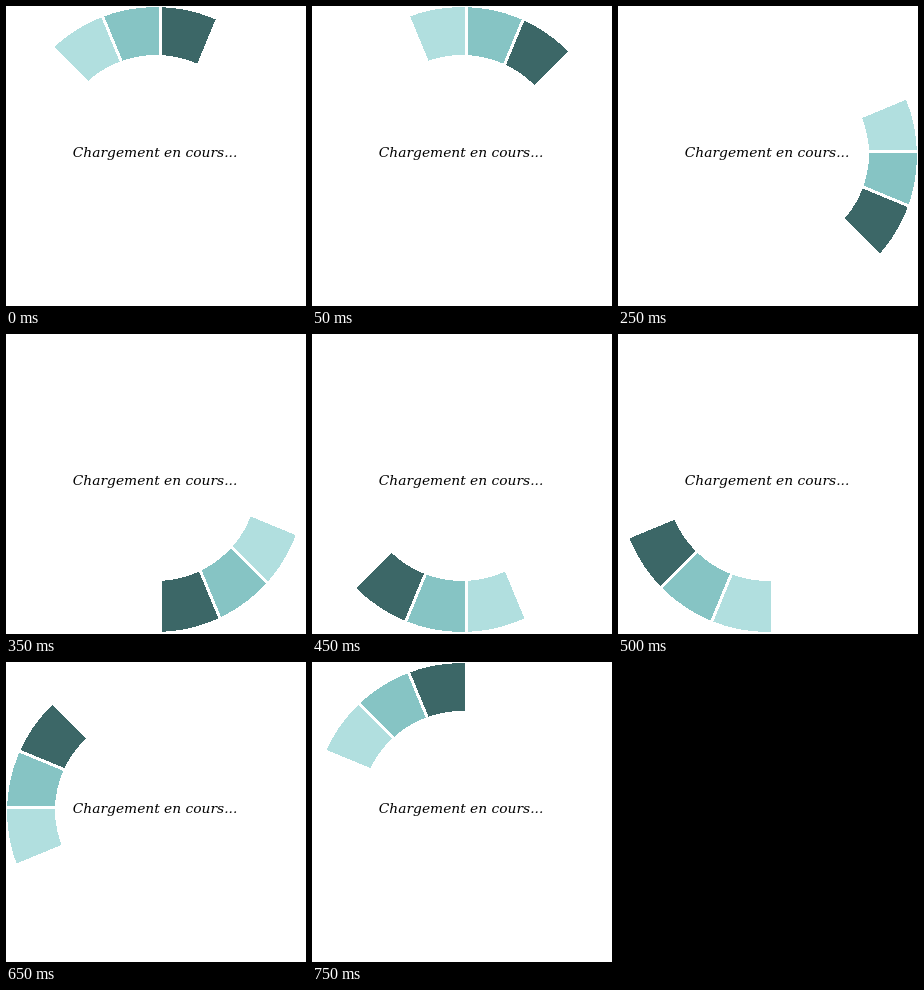
These frames come from a looping animation (300 px wide and 300 px high, 800 ms). An HTML page:

```html
<!DOCTYPE html>
<html lang="fr">
<head>
<meta charset="utf-8">
<title>Chargement</title>
<style>
  html, body { margin: 0; width: 100%; height: 100%; overflow: hidden; background: #fff; }
  svg { display: block; width: 300px; height: 300px; }
  text { font: italic 13.8px "DejaVu Serif", serif; fill: #000; }
  polygon { stroke: #fff; stroke-width: 3px; }
</style>
</head>
<body>
<svg viewBox="0 0 300 300">
  <g shape-rendering="crispEdges">
    <g id="wheel"></g>
    <!-- White everywhere except the ring -->
    <path fill="#fff" fill-rule="evenodd" d="M-99-99H399V399H-99Z
      M1 149.5a149 148.5 0 0 1 298 0a149 148.5 0 0 1-298 0Z
      M49 148a101 99 0 0 1 202 0a101 99 0 0 1-202 0Z"/>
  </g>
  <text x="66.8" y="151">Chargement en cours...</text>
</svg>
<script>
const N = 16, STEP = 50;
const TRAIL = ['#3c6767', '#86c4c4', '#b1dfdf'];
const HUB = { x: 154.5, y: 145.5 };
const SHIFT = 2.6;
const wheel = document.getElementById('wheel');

// Point on spoke k, clockwise from the top; diagonal spokes sit a little beside the hub
function spoke(k, r) {
  const a = k * 2 * Math.PI / N;
  const sin = Math.sin(a), cos = Math.cos(a);
  const side = SHIFT * Math.sin(2 * a);
  return [HUB.x + r * sin + side * cos, HUB.y - r * cos + side * sin];
}

const sectors = Array.from({ length: N }, (_, k) => {
  const el = document.createElementNS('http://www.w3.org/2000/svg', 'polygon');
  el.setAttribute('points', [spoke(k, 60), spoke(k, 200), spoke(k + 1, 200), spoke(k + 1, 60)].join(' '));
  return wheel.appendChild(el);
});

function draw(time) {
  const head = Math.floor(time / STEP) % N;
  sectors.forEach((el, k) => {
    el.setAttribute('fill', TRAIL[(head - k + N) % N] || 'none');
  });
}

const start = performance.now();
function tick() {
  draw(performance.now() - start);
  requestAnimationFrame(tick);
}
tick();
</script>
</body>
</html>
```
